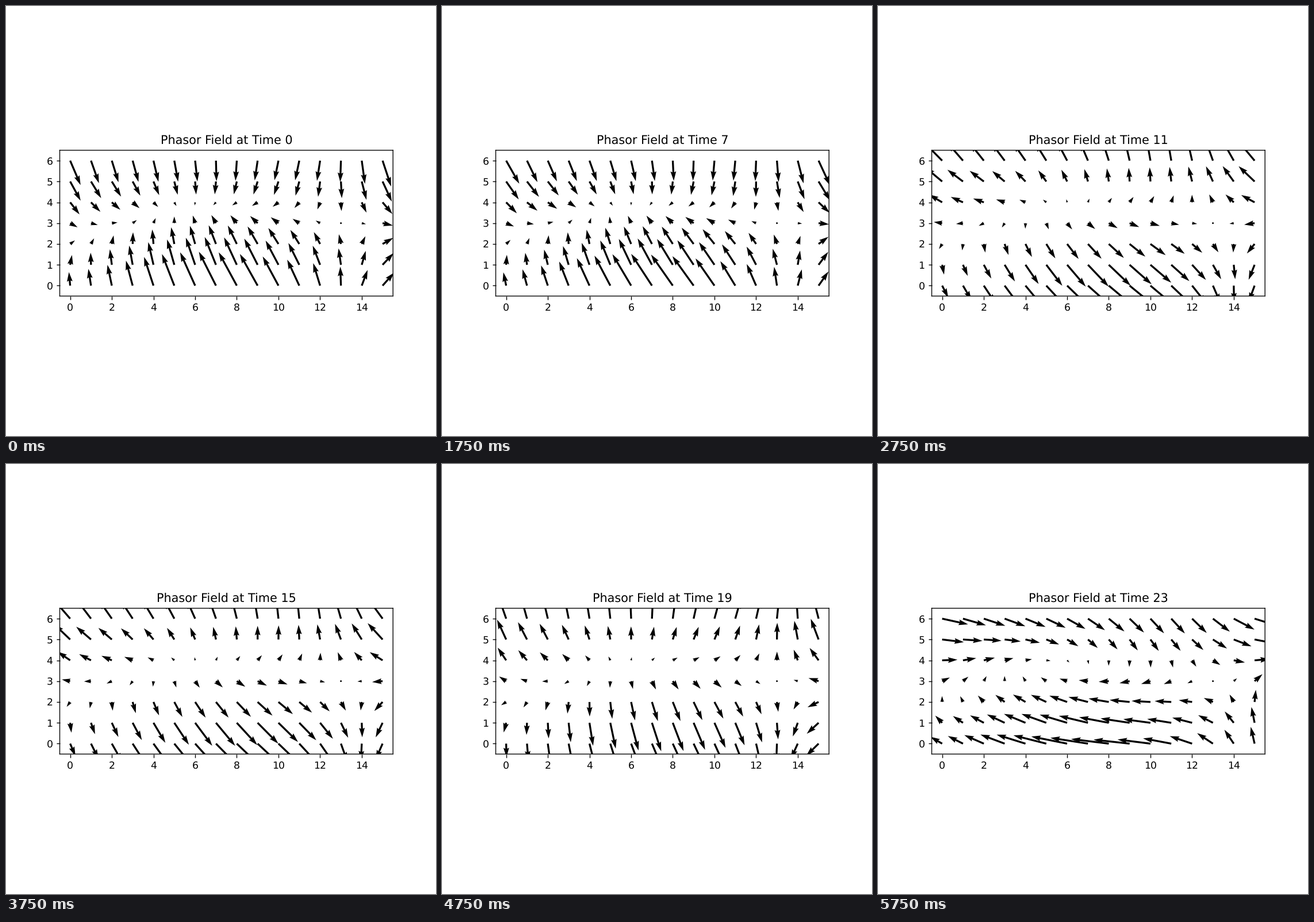
Recreate the animation shown at these times as a matplotlib script. Size 748 by 748 pixels, loop 6 s.

```python
import numpy as np
import matplotlib.pyplot as plt
from matplotlib.animation import FuncAnimation

plt.rcParams["text.hinting"] = "none"

SIZE, DPI = 748, 748 / 6
ROWS, COLS = 7, 16
STEPS = 24

# Key phasors (u + vi) on a coarse grid; the field is a smooth surface through them
KEY_ROWS = [0, 2, 4, 6]
KEY_COLS = [0, 3, 6, 9, 12, 15]
KEYS = np.array([
    [-.06 + .65j, -.32 + 1.2j, -.72 + 1.6j, -.85 + 1.52j, -.33 + 1.08j, .55 + .62j],
    [.23 + .17j, .02 + .56j, -.25 + .87j, -.48 + .84j, -.30 + .57j, .51 + .29j],
    [.45 - .58j, .33 - .28j, -.02 - .15j, -.27 - .17j, -.13 - .34j, .47 - .56j],
    [.50 - 1.17j, .28 - 1.02j, .11 - 1.0j, -.14 - .95j, -.15 - .97j, .41 - 1.24j],
])

# The whole field turns together: two rests with a half-turn flip between them
TURN_STEPS = [0, 3, 7, 8, 9, 10, 12, 16, 19, 20, 23]
TURN_DEGREES = [0, 6.5, 6.5, 1, -14, -154, -163, -162, -184, -210, -305.5]


def basis(count, knots):
    """Weights of the polynomial through the knots at 0 .. count-1."""
    n = len(knots)
    return np.vander(np.arange(count), n) @ np.linalg.inv(np.vander(knots, n))


PHASORS = basis(ROWS, KEY_ROWS) @ KEYS @ basis(COLS, KEY_COLS).T


def field(step):
    turn = np.radians(np.interp(step, TURN_STEPS, TURN_DEGREES))
    z = PHASORS * np.exp(1j * turn)
    return z.real, z.imag


fig, ax = plt.subplots(figsize=(SIZE / DPI, SIZE / DPI), dpi=DPI)
ax.set_aspect("equal")
ax.set_xlim(-0.5, COLS - 0.5)
ax.set_ylim(-0.5, ROWS - 0.5)
ax.set_xticks(range(0, COLS, 2))
ax.set_yticks(range(ROWS))

# Keep the frame and ticks at their true sub-pixel places
for line in [*ax.spines.values(), *ax.get_xticklines(), *ax.get_yticklines()]:
    line.set_snap(False)

x, y = np.meshgrid(np.arange(COLS), np.arange(ROWS))
arrows = ax.quiver(x, y, *field(0), angles="uv", scale_units="x", scale=1)
title = ax.set_title("Phasor Field at Time 0")


def update(step):
    arrows.set_UVC(*field(step))
    title.set_text(f"Phasor Field at Time {step}")
    return arrows, title


anim = FuncAnimation(fig, update, frames=STEPS, interval=250,
                     repeat=True, repeat_delay=0, blit=False)
plt.show()
```
